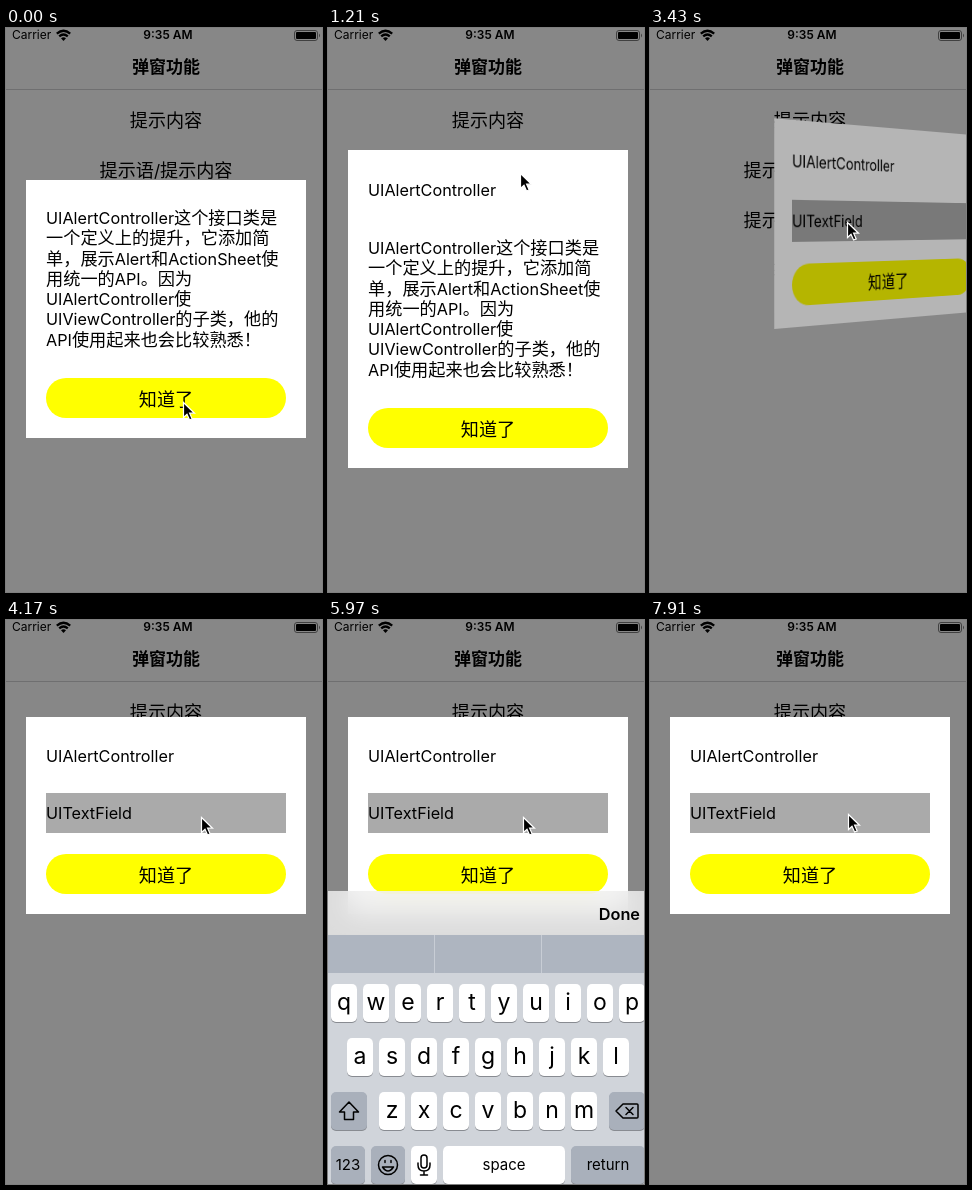
Animation, 316 px wide and 564 px high, one loop 8000 ms. Source, as an HTML page:

```html
<!DOCTYPE html>
<html lang="zh-CN">
<head>
<meta charset="utf-8">
<title>弹窗功能</title>
<style>
html, body { margin: 0; width: 100%; height: 100%; overflow: hidden; }
#stage { position: relative; width: 316px; height: 564px; overflow: hidden; background: #fdfdfd; color: #000;
  font-family: Inter, "Noto Sans CJK SC", "Noto Sans CJK", sans-serif; }
#stage * { box-sizing: border-box; }
div, svg { position: absolute; }
svg { overflow: visible; }
i { font-style: normal; font-size: .943em; }
.text { height: 24px; line-height: 24px; white-space: pre; }
.mid { left: 0; width: 320px; text-align: center; font-size: 18.1px; }
#dim { inset: 0; background: rgba(0, 0, 0, .465); }
.dialog { left: 20px; width: 280px; background: #fff; }
.dialog .text { left: 20px; font-size: 17.2px; }
.dialog .body { line-height: 20.3px; }
.button { left: 20px; width: 240px; height: 40px; border-radius: 20px; background: #ff0;
  font-size: 18.1px; line-height: 42px; text-align: center; }
.field { left: 20px; top: 76px; width: 240px; height: 40px; background: #aaa; }
#caret { left: 104px; top: 85px; width: 2px; height: 21px; background: #426bf2; }
#keyboard { left: 0; top: 268px; width: 320px; height: 296px; }
#bar { width: 100%; height: 44px; background: rgba(240, 240, 240, .82); backdrop-filter: blur(12px); }
#done { right: 8px; top: 11px; font-size: 16.3px; font-weight: 600; }
#hints { top: 44px; width: 100%; height: 38px; background: #aeb5c0; overflow: hidden; }
#hints b { position: absolute; width: 1px; height: 38px; background: #c8cdd5; }
#hint { right: 227px; top: 5px; font-size: 16px; color: #fff; }
#keys { top: 82px; width: 100%; height: 214px; background: #d0d4da; }
.key { height: 38px; border-radius: 5px; background: #fff; box-shadow: 0 1px #888b91;
  font-size: 23px; line-height: 36px; text-align: center; }
.key.dark { background: #a9b0bb; }
.key.word { font-size: 15px; line-height: 38px; }
.key svg { left: 0; top: 0; width: 100%; height: 100%; fill: none; stroke: #000; stroke-width: 1.5; stroke-linejoin: round; stroke-linecap: round; }
</style>
</head>
<body>
<div id="stage"></div>
<script>
const LOOP = 8000, TICK = 149; // the screen refreshes in coarse ticks

const mix = s => s.replace(/[\x20-\x7e]+/g, m => `<i>${m}</i>`);
const text = (s, y, cls = '', style = '') =>
  `<div class="text ${cls}" style="top:${y - 12}px;${style}">${mix(s)}</div>`;
const dialog = (top, height, inner) =>
  `<div class="dialog" style="top:${top}px;height:${height}px">${inner}
   <div class="button" style="top:${height - 60}px">知道了</div></div>`;
const body = y => `<div class="text body" style="top:${y - 10}px">${mix(`UIAlertController这个接口类是
一个定义上的提升，它添加简
单，展示Alert和ActionSheet使
用统一的API。因为
UIAlertController使
UIViewController的子类，他的
API使用起来也会比较熟悉！`)}</div>`;

const key = (x, row, w, label, cls = '') =>
  `<div class="key ${cls}" style="left:${x}px;top:${11 + row * 54}px;width:${w}px">${label}</div>`;
const letters = (s, x, row) => [...s].map((c, i) => key(x + i * 32, row, 26, c)).join('');
const icon = path => `<svg>${path}</svg>`;

const status = `
  <div class="text" style="left:6px;top:-5px;font-size:12px">Carrier</div>
  <div class="text" style="left:4px;width:316px;top:-5px;font-size:12px;font-weight:600;text-align:center">9:35 AM</div>
  <svg width="316" height="16" fill="none" stroke="#000" stroke-width="2.3">
    <path d="M50.8 5.6Q57.5 -.2 64.2 5.6M53.2 8.3Q57.5 4.6 61.8 8.3"/>
    <path d="M55 10.3Q57.5 8.2 60 10.3L57.5 13Z" fill="#000" stroke="none"/>
    <rect x="288.5" y="2.5" width="23" height="10" rx="2.5" stroke="#777" stroke-width="1"/>
    <rect x="290" y="4" width="20" height="7" rx="1" fill="#000" stroke="none"/>
    <path d="M313 5.5Q315 7.5 313 9.5Z" fill="#777" stroke="none"/>
  </svg>`;

const keys =
  letters('qwertyuiop', 3, 0) + letters('asdfghjkl', 19, 1) + letters('zxcvbnm', 51, 2) +
  key(3, 2, 36, icon('<path d="M18 10L27.5 20H22.5V27.5H13.5V20H8.5Z"/>'), 'dark') +
  key(281, 2, 36, icon('<path d="M7 19L14 12H28Q29 12 29 13V25Q29 26 28 26H14ZM17 15.5L24 22.5M24 15.5L17 22.5"/>'), 'dark') +
  key(3, 3, 34, '123', 'dark word') +
  key(43, 3, 34, icon('<circle cx="17" cy="19" r="9.5"/><path d="M11.5 21Q17 29 22.5 21ZM14 14.5V16.5M20 14.5V16.5"/>'), 'dark') +
  key(83, 3, 26, icon('<rect x="10" y="9" width="6" height="13" rx="3"/><path d="M7 17V19Q7 25 13 25Q19 25 19 19V17M13 25V29M9.5 29H16.5"/>')) +
  key(115, 3, 122, 'space', 'word') + key(243, 3, 74, 'return', 'dark word');

const $ = id => document.getElementById(id);
$('stage').innerHTML = status +
  text('弹窗功能', 39, 'mid', 'font-size:17px;font-weight:600') +
  '<div style="top:61px;width:100%;height:1px;background:#cfcfd1"></div>' +
  ['提示内容', '提示语/提示内容', '提示语/输入内容', '输入内容']
    .map((s, i) => text(s, 92 + i * 50, 'mid')).join('') +
  '<div id="dim"></div>' +
  dialog(152, 258, body(38)) +
  dialog(122, 318, text('UIAlertController', 40) + body(98)) +
  dialog(97, 196.5, text('UIAlertController', 38.5) + '<div class="field"></div>' +
    text('UITextField', 96) + '<div id="caret"></div>') +
  `<div id="keyboard">
    <div id="bar"><div id="done" class="text">Done</div></div>
    <div id="hints"><b style="left:106px"></b><b style="left:213px"></b><div id="hint" class="text">“UITextField”</div></div>
    <div id="keys">${keys}</div>
  </div>
  <svg id="cursor" width="14" height="20"><path d="M.5 .5V15.5L4 12.2L6.6 18L9.2 16.9L6.6 11.2H11.5Z" stroke="#fff" stroke-width="1.2"/></svg>`;

const clamp = p => Math.max(0, Math.min(1, p));
const ramp = (t, start, length) => clamp((t - start) / length);
const easeOut = p => 1 - (1 - p) ** 3;
const smooth = p => p * p * (3 - 2 * p);

const dialogs = [[-1000, 60], [610, 2000], [3120, 9000]]
  .map(([open, close], i) => ({ open, close, el: document.querySelectorAll('.dialog')[i] }));

// start, end, x, y of each pointer move
const moves = [[300, 700, 192, 145], [1500, 1780, 184, 400], [2400, 2850, 197, 194],
  [4100, 4160, 195, 197], [6480, 6900, 281, 287], [7500, 7880, 198, 194]];

function pointer(t) {
  let x = 177, y = 374;
  for (const [start, end, toX, toY] of moves) {
    const p = smooth(ramp(t, start, end - start));
    x += (toX - x) * p;
    y += (toY - y) * p;
  }
  return [x, y];
}

function draw(t) {
  let dim = 0;
  for (const { open, close, el } of dialogs) {
    const left = 1 - ramp(t, close, 230), angle = 90 * (1 - ramp(t, open, 500));
    if (t > open) dim = Math.max(dim, ramp(t, open, 250) * left);
    el.style.visibility = t > open && left > 0 ? 'visible' : 'hidden';
    el.style.opacity = left;
    // a face of a cube turning in from the right
    el.style.transform = angle ? `perspective(845px) translateZ(-140px) rotateY(${angle}deg) translateZ(140px)` : 'none';
    el.style.filter = angle ? `brightness(${1 - .5 * Math.sin(angle * Math.PI / 180)})` : 'none';
  }
  $('dim').style.opacity = dim;

  const up = easeOut(ramp(t, 5565, 500)) - easeOut(ramp(t, 7350, 450));
  $('keyboard').style.transform = `translateY(${296 * (1 - up)}px)`;
  $('keyboard').style.visibility = up > 0 ? 'visible' : 'hidden';
  $('caret').style.opacity = +(t > 6500 && t < 7400);
  $('hint').style.opacity = +(t > 6500);
  $('done').style.color = t > 7100 && t < 7290 ? '#bcbcbc' : '#000';

  const [x, y] = pointer(t);
  $('cursor').style.transform = `translate(${x}px,${y}px)`;
}

function frame() {
  const t = performance.now() % LOOP;
  draw(Math.max(0, Math.floor((t + 3) / TICK) * TICK - 3));
  requestAnimationFrame(frame);
}
frame();
</script>
</body>
</html>
```
